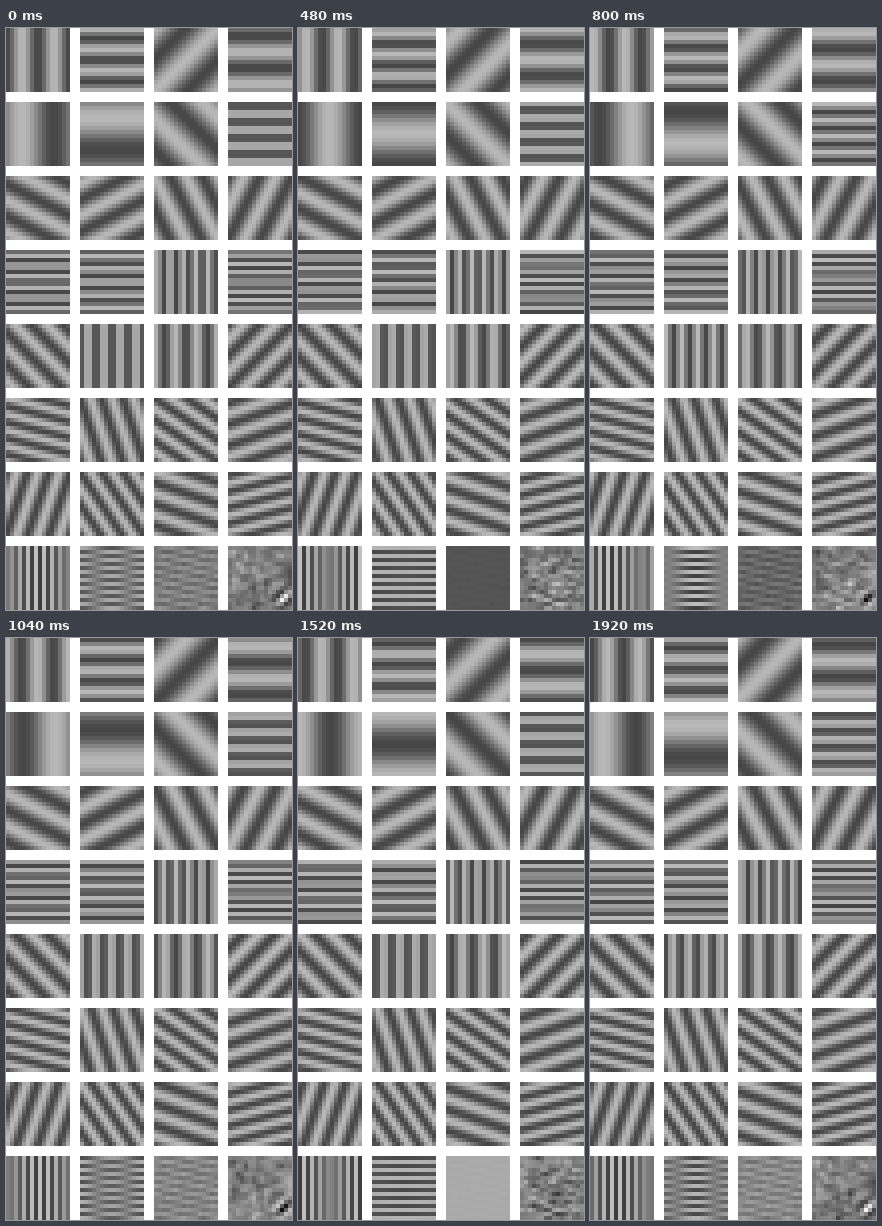
A matplotlib script that plays this animation: 286x582 px, repeating every 2000 ms.

```python
import numpy as np
import matplotlib.pyplot as plt
from matplotlib.animation import FuncAnimation

W, H, DPI = 286, 582, 100
FRAMES, STEP = 25, 80
CELLS, CELL, PITCH, COLS = 16, 4, 74, 4
MID, AMP, TAU = 127, 57, 2 * np.pi

rng = np.random.default_rng(7)
j, i = np.mgrid[:CELLS, :CELLS]
# cell centres measured from the middle of the tile
x, y = (i + .5) / CELLS - .5, (j + .5) / CELLS - .5


def wave(kx, ky, quarter=0, amp=AMP):
    """Whole waves per tile, starting on a quarter turn about the middle."""
    return lambda t: MID - amp * np.cos(TAU * (kx * x + ky * y - quarter / 4 - t))


# negative wave numbers travel backwards
def across(n, quarter=0):
    return wave(n, 0, quarter)


def down(n, quarter=0):
    return wave(0, n, quarter)


def rise(a, b, quarter=0):
    return wave(a, b, quarter)


def fall(a, b, quarter=0):
    return wave(a, -b, quarter)


def pair(even, odd, mean=0):
    """Two patterns a quarter turn apart, with an optional swing in brightness."""
    return lambda t: MID + np.cos(TAU * t) * even + np.sin(TAU * t) * (odd + mean)


def noise(size, axes=()):
    a = rng.normal(size=(CELLS, CELLS))
    for axis in axes:
        a = (a + np.roll(a, 1, axis)) / 1.4
    return size * a


def blob():
    spot = np.exp(-((i - 13.4) ** 2 + (j - 12.6) ** 2) / 5)
    return noise(20, (0, 1)) * (1 - spot) + 125 * spot * np.cos(TAU * (i + j - 26) / 5)


comb = (-1.0) ** j
weave = 19 * np.cos(TAU * (7.2 * y - 1.5 * x)) + noise(5)

TILES = [
    across(-2), down(3), rise(1, 1, 2), down(2, 1),
    across(1, 1), down(1, 1), fall(1, 1, 1), down(4, 1),
    fall(1, 2, 1), rise(-1, -2, 3), fall(2, 1), rise(2, 1, 2),
    down(6), down(5, 2), across(-5, 3), down(-7, 2),
    fall(2, 2, 3), across(-4), across(3), rise(-2, -2),
    fall(1, 4), fall(3, 1), fall(2, 3, 2), rise(-1, -3, 3),
    rise(-3, -1), fall(-3, -2, 2), fall(-1, -3, 2), rise(1, 4, 3),
    wave(-7.5, 0, 3, 65),
    pair(-42 * comb * np.cos(TAU * x), 50 * comb),
    pair(weave, 0, -43),
    pair(blob(), noise(22, (1,))),
]


def picture(n):
    img = np.full((H, W), 255.0)
    size = CELLS * CELL
    for k, tile in enumerate(TILES):
        top, left = PITCH * (k // COLS), PITCH * (k % COLS)
        img[top:top + size, left:left + size] = np.kron(tile(n / FRAMES), np.ones((CELL, CELL)))
    return np.clip(img, 0, 255)


fig = plt.figure(figsize=(W / DPI, H / DPI), dpi=DPI, facecolor="white")
ax = fig.add_axes([0, 0, 1, 1])
ax.axis("off")
view = ax.imshow(picture(0), cmap="gray", vmin=0, vmax=255,
                 interpolation="nearest", aspect="auto")


def update(n):
    view.set_data(picture(n))
    return [view]


anim = FuncAnimation(fig, update, frames=FRAMES, interval=STEP,
                     repeat=True, repeat_delay=0, blit=False)
plt.show()
```
